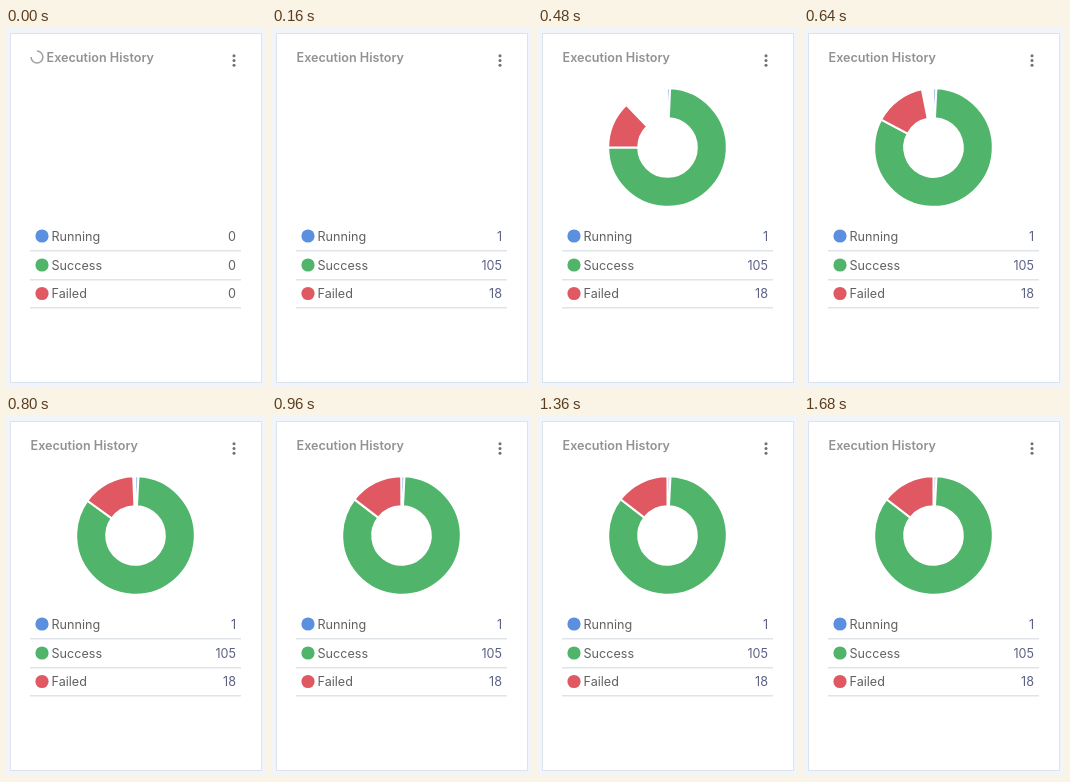
Recreate the animation shown at these times as an HTML page with a canvas. Size 260 px wide and 360 px high, loop 1.76 s.

```html
<!DOCTYPE html>
<html lang="en">
<head>
<meta charset="utf-8">
<title>Execution History</title>
<style>
html, body { margin: 0; width: 100%; height: 100%; overflow: hidden; background: #f1f5fa; }
canvas { display: block; width: 260px; height: 360px; }
</style>
</head>
<body>
<canvas id="stage"></canvas>
<script>
const W = 260, H = 360, LOOP = 1760, STEP = 80;
const LOADED = 160, SWEEP_START = 173, SWEEP_TIME = 1330;
const TAU = Math.PI * 2;
const FONT = 'Inter, "Open Sans", sans-serif';
const rows = [
  { name: 'Running', count: 1, color: '#5b8fe0', y: 208 },
  { name: 'Success', count: 105, color: '#50b56b', y: 237 },
  { name: 'Failed', count: 18, color: '#df5862', y: 265.5 }
];
const total = rows.reduce((sum, row) => sum + row.count, 0);

const canvas = document.getElementById('stage');
const ctx = canvas.getContext('2d');
const ratio = window.devicePixelRatio || 1;
canvas.width = W * ratio;
canvas.height = H * ratio;
ctx.scale(ratio, ratio);

function disc(x, y, r, color) {
  ctx.fillStyle = color;
  ctx.beginPath();
  ctx.arc(x, y, r, 0, TAU);
  ctx.fill();
}

function label(text, x, y, color, weight = 400, align = 'left') {
  ctx.font = `${weight} 12.6px ${FONT}`;
  ctx.textAlign = align;
  ctx.textBaseline = 'alphabetic';
  ctx.fillStyle = color;
  ctx.fillText(text, x, y);
}

function drawCard() {
  ctx.fillStyle = '#f1f5fa';
  ctx.fillRect(0, 0, W, H);
  ctx.fillStyle = '#fff';
  ctx.fillRect(4, 5, 252, 350);
  ctx.strokeStyle = '#dce3ea';
  ctx.lineWidth = 1;
  ctx.strokeRect(4.5, 5.5, 251, 349);
  for (const y of [27.8, 32.5, 37.2]) disc(228, y, 1.5, '#707070');
}

function drawSpinner(time) {
  const turn = time / 1000 * TAU;
  ctx.strokeStyle = '#a0a0a0';
  ctx.lineWidth = 1.5;
  ctx.beginPath();
  ctx.arc(31, 29, 5.9, turn - Math.PI / 2, turn + Math.PI);
  ctx.stroke();
}

function drawRows(loaded) {
  for (const { name, count, color, y } of rows) {
    disc(36, y, 6.6, color);
    label(name, 45.5, y + 4.5, '#616161');
    label(loaded ? count : 0, 230, y + 4.5, loaded ? '#5c6285' : '#616161', 400, 'right');
  }
  ctx.fillStyle = '#dfe4e8';
  for (const y of [222, 251, 279]) ctx.fillRect(24, y, 211, 1.5);
}

function drawRing(progress) {
  let from = -Math.PI / 2;
  ctx.lineWidth = 2;
  ctx.strokeStyle = '#fff';
  for (const { count, color } of rows) {
    const to = from + count / total * TAU * progress;
    ctx.beginPath();
    ctx.arc(129.5, 119.5, 59.3, from, to);
    ctx.arc(129.5, 119.5, 29.3, to, from, true);
    ctx.closePath();
    ctx.fillStyle = color;
    ctx.fill();
    ctx.stroke();
    from = to;
  }
}

function draw(time) {
  const loaded = time >= LOADED;
  drawCard();
  label('Execution History', loaded ? 24.5 : 40.5, 33.5, '#929292', 600);
  drawRows(loaded);
  if (!loaded) return drawSpinner(time);
  const t = Math.min(1, Math.max(0, (time - SWEEP_START) / SWEEP_TIME));
  if (t > 0) drawRing(1 - (1 - t) ** 8);
}

const origin = performance.now();
function tick() {
  const time = (performance.now() - origin) % LOOP;
  draw(Math.floor(time / STEP) * STEP);
  requestAnimationFrame(tick);
}
tick();
</script>
</body>
</html>
```
